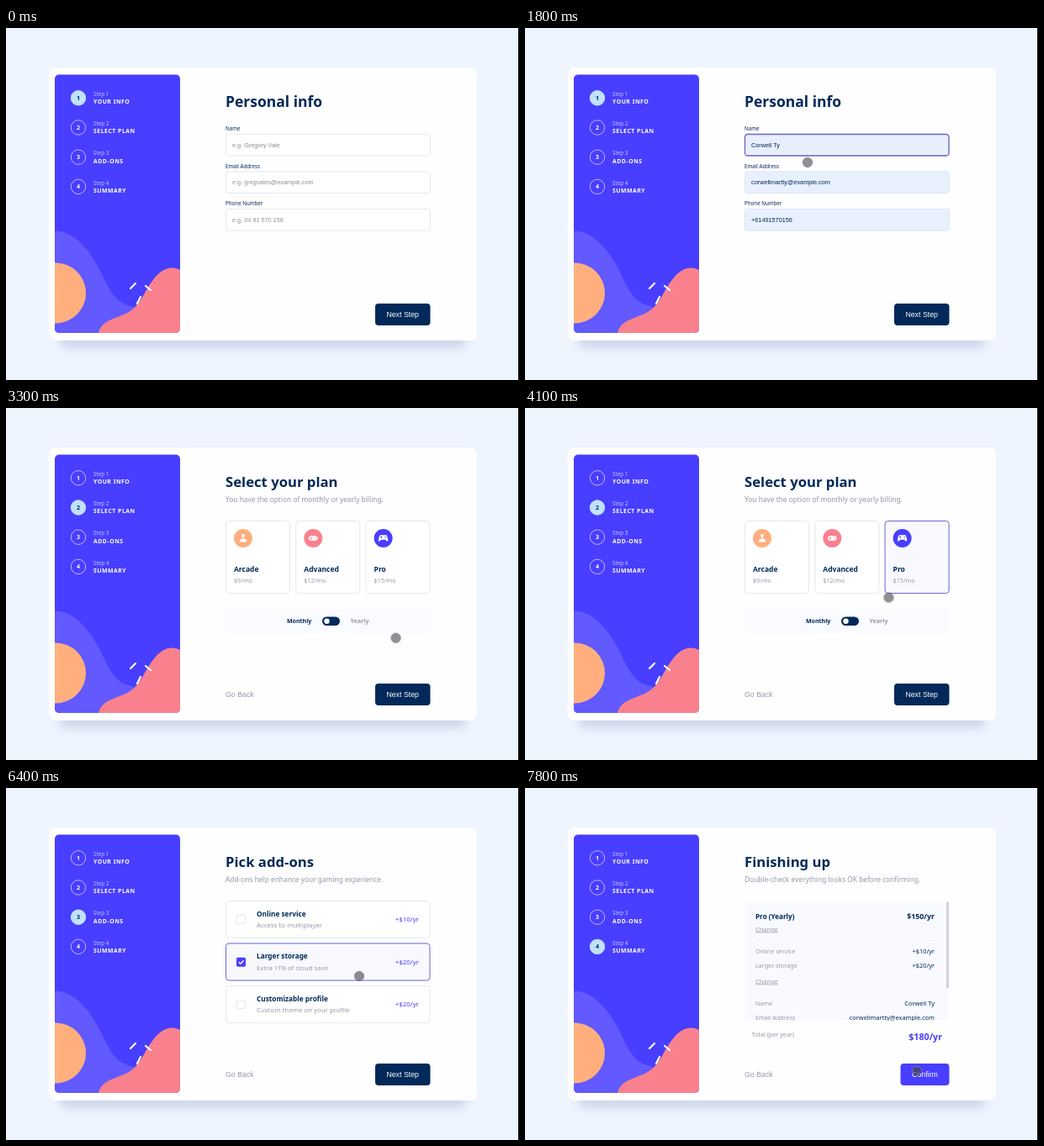
An HTML page that plays this animation: 610x419 px, repeating every 8000 ms.

```html
<!DOCTYPE html>
<html lang="en">
<head>
<meta charset="utf-8">
<title>Multi-step form</title>
<style>
  html, body { margin: 0; width: 100%; height: 100%; overflow: hidden; background: #eff5ff; }
  svg { display: block; width: 610px; height: 419px; font-family: "Noto Sans", sans-serif; }
  text { fill: #022959; font-size: 7.2px; }
  .bold { font-weight: 700; }
  .grey { fill: #9699aa; }
  .white { fill: #fff; }
  .purple { fill: #483eff; }
  .end { text-anchor: middle; text-anchor: end; }
  .mid { text-anchor: middle; }
  .link { text-decoration: underline; font-weight: 500; font-size: 7.4px; }
  .title { font-size: 16.7px; font-weight: 700; }
  .lead { font-size: 8.35px; }
  .label { font-size: 6.2px; }
  .button, .input { font-family: "Liberation Sans", Arial, sans-serif; }
  .button { font-size: 8.8px; }
  .input { font-size: 7.3px; }
  .hint { fill: #8b8f9c; }
  .step { font-size: 6.3px; font-weight: 300; fill: #c3c4ff; }
  .step-name { font-size: 6.9px; letter-spacing: .5px; }
  .name { font-size: 8.4px; }
  .box { fill: #fff; stroke: #e6e8f1; }
  .chosen { fill: #f8f9ff; stroke: #7068d8; }

  /* Hard cuts: each class is visible only inside its own window. */
  .cut { opacity: 0; animation: 8s step-end infinite; }
  .info { animation-name: info; }
  .plan { animation-name: plan; }
  .addons { animation-name: addons; }
  .summary { animation-name: summary; }
  .empty { animation-name: empty; }
  .filled { animation-name: filled; }
  .focus { animation-name: focus; }
  .caret { animation-name: caret; }
  .pro { animation-name: pro; }
  .monthly { animation-name: monthly; }
  .yearly { animation-name: yearly; }
  .larger { animation-name: larger; }
  .online { animation-name: online; }
  @keyframes info { 0% { opacity: 1 } 33.75%, 100% { opacity: 0 } }
  @keyframes plan { 33.75% { opacity: 1 } 67.5%, 100% { opacity: 0 } }
  @keyframes addons { 67.5% { opacity: 1 } 90%, 100% { opacity: 0 } }
  @keyframes summary { 90%, 100% { opacity: 1 } }
  @keyframes empty { 0% { opacity: 1 } 17.5%, 100% { opacity: 0 } }
  @keyframes filled { 17.5%, 100% { opacity: 1 } }
  @keyframes focus { 10.6%, 100% { opacity: 1 } }
  @keyframes caret { 10.6% { opacity: 1 } 17.5%, 100% { opacity: 0 } }
  @keyframes pro { 47.5%, 100% { opacity: 1 } }
  @keyframes monthly { 0% { opacity: 1 } 57.5%, 100% { opacity: 0 } }
  @keyframes yearly { 57.5%, 100% { opacity: 1 } }
  @keyframes larger { 78.75%, 100% { opacity: 1 } }
  @keyframes online { 85%, 100% { opacity: 1 } }

  .toggle { animation: drop 8s step-end infinite; }
  @keyframes drop { 0% { transform: none } 57.5%, 100% { transform: translateY(11px) } }
  .knob { animation: knob 8s infinite; }
  @keyframes knob { 0%, 57.2% { transform: none } 59%, 100% { transform: translateX(10px) } }

  .cursor { animation: cursor 8s ease-in-out infinite; }
  @keyframes cursor {
    0%, 3.7% { opacity: 0; transform: translate(430px, 290px) }
    3.75% { opacity: 1; transform: translate(430px, 290px) }
    8.75%, 13.1% { transform: translate(332px, 133px) }
    17.5%, 24.4% { transform: translate(336px, 160px) }
    30.6%, 34.4% { transform: translate(472px, 342px) }
    37.5%, 39.4% { transform: translate(464px, 300px) }
    45%, 48% { transform: translate(462px, 186px) }
    51.25% { transform: translate(432.5px, 225.5px) }
    55.6%, 58% { transform: translate(387px, 255px) }
    63.5%, 67.5% { transform: translate(475.5px, 342px) }
    78%, 80.2% { transform: translate(420px, 224px) }
    84%, 86% { transform: translate(410px, 160px) }
    89%, 93.5% { transform: translate(472px, 342px) }
    97.2%, 100% { opacity: 1; transform: translate(466px, 337px) }
  }
</style>
</head>
<body>
<svg id="stage" viewBox="0 0 610 419"></svg>
<script>
const text = (x, y, str, cls = '', size) =>
  `<text x="${x}" y="${y}" class="${cls}"${size ? ` style="font-size:${size}px"` : ''}>${str}</text>`;
const rect = (x, y, w, h, r, attrs) =>
  `<rect x="${x}" y="${y}" width="${w}" height="${h}" rx="${r}" ${attrs}/>`;
const circle = (x, y, r, attrs) => `<circle cx="${x}" cy="${y}" r="${r}" ${attrs}/>`;
const cut = (cls, ...parts) => `<g class="cut ${cls}">${parts.join('')}</g>`;
const each = (list, draw) => list.map(draw).join('');

const heading = (title, lead) => text(261, 94, title, 'title') + text(261, 112, lead, 'lead grey');
const goBack = text(261, 344, 'Go Back', 'button grey');
const nextButton = rect(439, 328, 65.5, 26, 4, 'fill="#022959"')
  + text(471.7, 344, 'Next Step', 'button white mid');

const backdrop = `
  <defs>
    <filter id="soft" x="-10%" y="-100%" width="120%" height="300%"><feGaussianBlur stdDeviation="6"/></filter>
    <clipPath id="side">${rect(58, 55.5, 149, 307.5, 5, '')}</clipPath>
    <clipPath id="panel">${rect(261, 135, 243, 142, 0, '')}</clipPath>
  </defs>
  ${rect(0, 0, 610, 419, 0, 'fill="#eff5ff"')}
  ${rect(64, 356, 483, 25, 6, 'fill="#9aa6c8" opacity=".4" filter="url(#soft)"')}
  ${rect(51, 47, 509, 325, 8, 'fill="#fefefe"')}
  ${rect(609, 0, 1, 419, 0, 'fill="#15151a"')}`;

const sidebar = `<g clip-path="url(#side)">
  ${rect(58, 55, 149, 308, 0, 'fill="#483eff"')}
  <path fill="#6259ff" d="M58 242C78 240 98 262 110 285C122 308 128 328 150 331L180 363H58Z"/>
  ${circle(59, 315.5, 36, 'fill="#ffaf7e"')}
  <path fill="#f9818e" d="M110 363C113 350 125 347 140 341C160 333 163 315 174 301C184 287 195 282 207 288V363Z"/>
  <path stroke="#fff" stroke-width="2.2" stroke-linecap="round" d="M148 310l6-6M166 307l6 5M156 328l4-8"/>
</g>`;

const pages = ['info', 'plan', 'addons', 'summary'];
const steps = each(['YOUR INFO', 'SELECT PLAN', 'ADD-ONS', 'SUMMARY'], (name, i) => {
  const y = 83.3 + i * 35.2;
  const number = cls => text(86, y + 2.5, i + 1, `bold mid ${cls}`, 7);
  return circle(86, y, 8.7, 'fill="none" stroke="#d5d4ff" stroke-width=".8"') + number('white')
    + cut(pages[i], circle(86, y, 9, 'fill="#bfe2fd"'), number(''))
    + text(104, y - 2.3, `Step ${i + 1}`, 'step') + text(104, y + 6.9, name, 'step-name bold white');
});

const fields = [
  ['Name', 'e.g. Gregory Vale', 'Corwell Ty'],
  ['Email Address', 'e.g. gregvales@example.com', 'corwellmartty@example.com'],
  ['Phone Number', 'e.g. 04 91 570 156', '+61491570156'],
];
const infoPage = cut('info',
  text(261, 94, 'Personal info', 'title', 17.5),
  each(fields, ([label, hint, value], i) => {
    const y = 126.5 + i * 44.5;
    return text(261, y - 4.5, label, 'label')
      + rect(261.5, y, 243, 25.5, 3, 'class="box"')
      + cut('empty', text(269, y + 15, hint, 'input hint'))
      + cut('filled', rect(261.5, y, 243, 25.5, 3, 'fill="#e8f0fe" stroke="#dfe6f4"'),
        text(269, y + 15, value, 'input'));
  }),
  cut('focus', rect(261.5, 126.5, 242.5, 25.5, 3.5, 'fill="none" stroke="#6b63c9" stroke-width="1.3"')),
  cut('caret', rect(269, 134.5, .8, 8.5, 0, 'fill="#222"')),
  nextButton);

const plans = [
  ['Arcade', 9, '#ffaf7e', `${circle(0, -3.2, 1.9, '')}<path d="M-.7-2h1.4v3h2.6l.8 3.6h-8.2l.8-3.6h2.6z"/>`],
  ['Advanced', 12, '#f9818e', rect(-5.3, -2.8, 10.6, 5.6, 2.8, '')
    + '<path stroke="#f9818e" stroke-width=".9" d="M-3.8 0h2.6M-2.5-1.3v2.6M2 0h1.8"/>'],
  ['Pro', 15, '#483eff', '<path d="M-3.5-3.8h7q1.4.3 2.2 6.4q-.6 2.6-3.2-.9h-5q-2.6 3.5-3.2.9q.8-6.1 2.2-6.4z"/>'
    + '<path stroke="#483eff" stroke-width=".8" d="M-3.6-1.3h2.4M-2.4-2.5v2.4M1.6-1.3h2.2"/>'],
];
const planBox = (x, cls) =>
  cut('monthly', rect(x, 134.5, 76, 86, 3.5, `class="${cls}"`))
  + cut('yearly', rect(x, 134.5, 76, 97, 3.5, `class="${cls}"`));
const planPage = cut('plan',
  heading('Select your plan', 'You have the option of monthly or yearly billing.'),
  each(plans, ([name, price, color, icon], i) => {
    const x = 261.5 + i * 83.3;
    return planBox(x, 'box')
      + (name === 'Pro' ? cut('pro', planBox(x, 'chosen')) : '')
      + circle(x + 20.5, 155, 11, `fill="${color}"`)
      + `<g fill="#fff" transform="translate(${x + 20.5} 155)">${icon}</g>`
      + text(x + 9.5, 195, name, 'bold', 8.5)
      + cut('monthly', text(x + 9.5, 208.3, `$${price}/mo`, 'grey'))
      + cut('yearly', text(x + 9.5, 208.3, `$${price * 10}/yr`, 'grey'),
        text(x + 9.5, 220, '2 months free', 'label'));
  }),
  `<g class="toggle">
    ${rect(261, 240, 243.5, 28, 4, 'fill="#fafbff"')}
    ${rect(376, 248.5, 21, 10.5, 5.2, 'fill="#022959"')}
    ${circle(381.5, 253.7, 3.2, 'class="knob" fill="#fff"')}
    ${cut('monthly', text(334, 256.3, 'Monthly', 'bold', 7), text(409.5, 256.3, 'Yearly', 'bold grey', 7.1))}
    ${cut('yearly', text(334, 256.3, 'Monthly', 'bold grey', 7), text(409.5, 256.3, 'Yearly', 'bold', 7.1))}
  </g>`,
  goBack, nextButton);

const addons = [
  ['Online service', 'Access to multiplayer', 10, 'online'],
  ['Larger storage', 'Extra 1TB of cloud save', 20, 'larger'],
  ['Customizable profile', 'Custom theme on your profile', 20],
];
const addonsPage = cut('addons',
  heading('Pick add-ons', 'Add-ons help enhance your gaming experience.'),
  each(addons, ([name, detail, price, chosen], i) => {
    const y = 134.5 + i * 50.5;
    return rect(261.5, y, 242.5, 44, 3.5, 'class="box"')
      + rect(274.5, y + 17, 10, 10, 1.5, 'class="box"')
      + (chosen ? cut(chosen, rect(261.5, y, 242.5, 44, 3.5, 'class="chosen"'),
        rect(274, y + 16.7, 11, 11, 1.8, 'fill="#483eff"'),
        `<path fill="none" stroke="#fff" stroke-width="1.3" d="M276.8 ${y + 22.3}l2 2l3.8-4"/>`) : '')
      + text(298, y + 18.2, name, 'bold', 8.25)
      + text(298, y + 31.8, detail, 'grey', 7.85)
      + text(491, y + 24.7, `+$${price}/yr`, 'purple end', 7.9);
  }),
  goBack, nextButton);

const rows = [
  [197, 'Online service', '+$10/yr'],
  [214, 'Larger storage', '+$20/yr'],
  [258.5, 'Name', fields[0][2]],
  [275.5, 'Email Address', fields[1][2]],
];
const summaryPage = cut('summary',
  heading('Finishing up', 'Double-check everything looks OK before confirming.'),
  `<g clip-path="url(#panel)">
    ${rect(261, 135, 243, 142, 4, 'fill="#f9faff"')}
    ${rect(274, 181, 213, .6, 0, 'fill="#eceef6"')}
    ${rect(501, 135.5, 3, 103, 1, 'fill="#d2d3d8"')}
    ${text(274, 156, 'Pro (Yearly)', 'bold', 8.15)}
    ${text(487, 156, '$150/yr', 'bold end', 8.8)}
    ${text(274, 170.5, 'Change', 'grey link')}
    ${text(274, 232.5, 'Change', 'grey link')}
    ${each(rows, ([y, label, value]) => text(274, y, label, 'grey') + text(487, y, value, 'end', 7.4))}
  </g>`,
  text(269.5, 296, 'Total (per year)', 'grey'),
  text(496, 299.5, '$180/yr', 'bold purple end', 10.7),
  goBack,
  rect(446.5, 328, 58, 26, 4, 'fill="#483eff"'),
  text(475.5, 344, 'Confirm', 'button white mid'));

const cursor = `<g class="cursor">${circle(0, 0, 5.7,
  'fill="#45454d" fill-opacity=".6" stroke="#85858c" stroke-opacity=".8"')}</g>`;

document.getElementById('stage').innerHTML =
  backdrop + sidebar + steps + infoPage + planPage + addonsPage + summaryPage + cursor;
</script>
</body>
</html>
```
